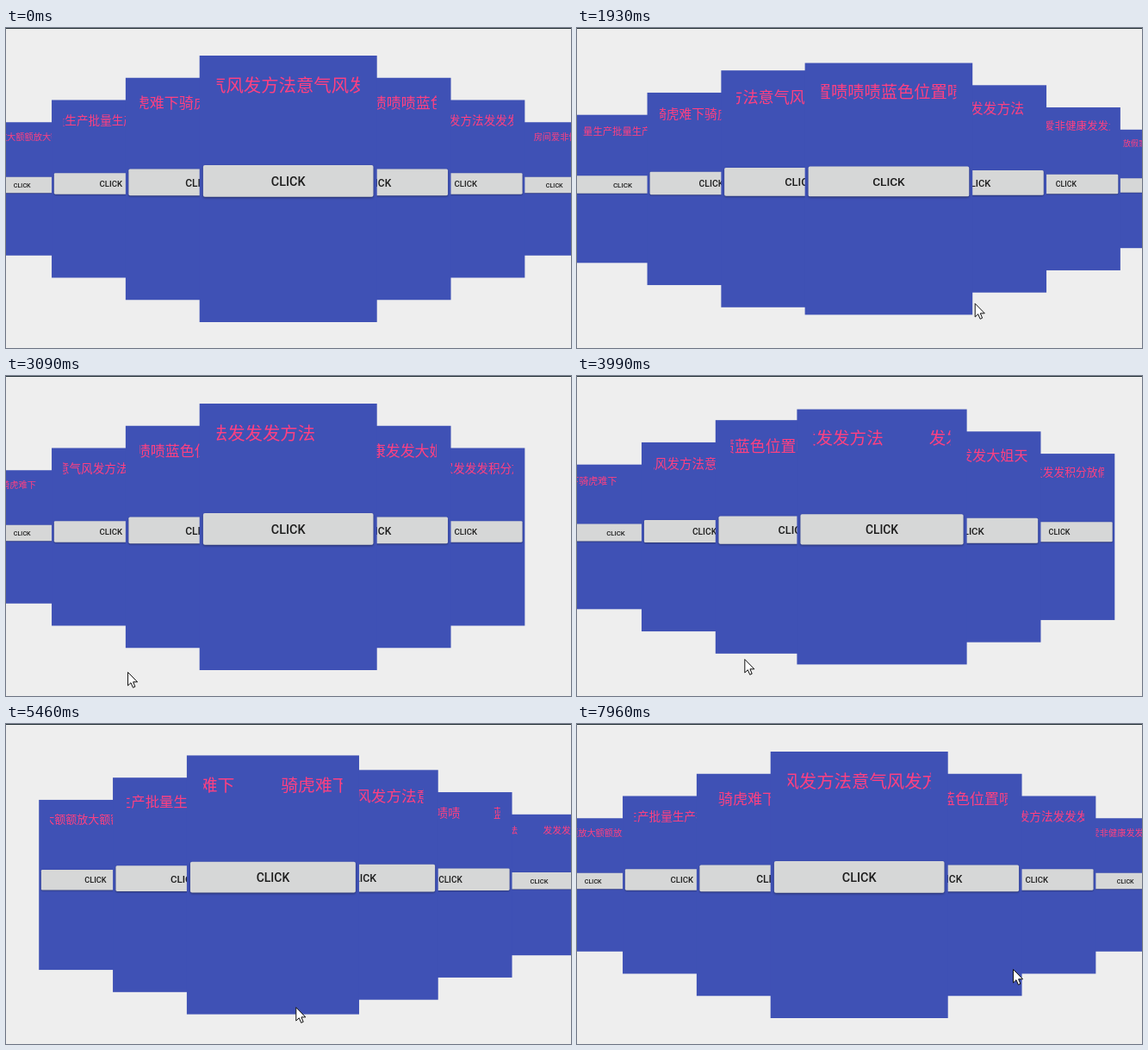
These frames come from a looping animation (656 px wide and 371 px high, 8000 ms). An HTML page with a canvas:

```html
<!DOCTYPE html>
<html lang="zh-CN">
<head>
<meta charset="utf-8">
<title>Card pager</title>
<style>
html, body { margin: 0; width: 100%; height: 100%; overflow: hidden; background: #eee; }
canvas { display: block; width: 656px; height: 371px; }
</style>
</head>
<body>
<canvas id="stage" width="656" height="371"></canvas>
<script>
const ctx = document.getElementById('stage').getContext('2d');
const LOOP = 8000;
const CENTER = { x: 327.7, y: 186.5 };
const CARD = { w: 206, h: 309, step: 103 };
const GLYPH = 20.4;
const FIELD = 83;              // half width of the text field
const GAP = FIELD * 2 / 3;     // space between marquee rounds
const SPEED = 33;              // px per second
const PAUSE = 1.2;             // seconds of rest before each round

// start: second at which a round begins; restart applies once the page was recreated
const cards = [
  { word: '放大额额', count: 8, start: -1.64, restart: -0.47 },
  { word: '生产批量', count: 7, start: -2.38 },
  { word: '骑虎难下', count: 4, start: -3.3 },
  { word: '意气风发方法', count: 5, start: -0.91 },
  { word: '蓝色位置啧啧啧', count: 3, start: -4.5 },
  { word: '发发发方法', count: 4, start: -5.8 },
  { word: '房间爱非健康发发大姐天', count: 1, start: 2.26, restart: 6.81 },
  { word: '放假家发发发积分', count: 4, start: 3.1 }
].map((c, index) => ({ ...c, index, text: c.word.repeat(c.count) }));

// [ms, page]
const pageKeys = [
  [0, 3], [1500, 3], [1600, 3.1], [1930, 3.666], [2470, 4.65], [2620, 4.88], [2800, 5],
  [3820, 5], [3900, 4.93], [4160, 4.4], [4720, 3.195], [5000, 2.59], [5200, 2.36],
  [5460, 2.173], [5780, 2], [6260, 2], [6400, 2.09], [6670, 2.36], [6760, 2.453],
  [7100, 2.8], [7280, 2.95], [7470, 3], [LOOP, 3]
];

// [ms, x, y]
const cursorKeys = [
  [420, 560, 371], [850, 600, 318], [1500, 590, 316], [1930, 462, 319], [2470, 300, 326],
  [3090, 141, 343], [3330, 150, 330], [3820, 170, 328], [4720, 298, 328], [5460, 336, 328],
  [5800, 440, 352], [6280, 480, 352], [6760, 392, 350], [7250, 330, 352], [7500, 330, 352],
  [7960, 506, 284], [LOOP, 506, 284]
];

function sample(keys, t) {
  let i = 1;
  while (i < keys.length - 1 && keys[i][0] < t) i++;
  const a = keys[i - 1], b = keys[i];
  const k = Math.min(1, Math.max(0, (t - a[0]) / (b[0] - a[0])));
  return a.slice(1).map((v, n) => v + (b[n + 1] - v) * k);
}

const mod = (a, n) => ((a % n) + n) % n;

function drawMarquee(card, t) {
  const period = card.text.length * GLYPH + GAP;
  const late = card.restart !== undefined && t > (card.index ? 5500 : 3000);
  const elapsed = mod(t / 1000 - (late ? card.restart : card.start), period / SPEED + PAUSE);
  const shift = Math.min(elapsed * SPEED, period);
  ctx.save();
  ctx.beginPath();
  ctx.rect(-FIELD, -140, FIELD * 2, 40);
  ctx.clip();
  ctx.fillStyle = '#ff4081';
  ctx.font = `${GLYPH}px "Noto Sans CJK SC", "Noto Sans CJK", sans-serif`;
  ctx.textAlign = 'left';
  ctx.textBaseline = 'alphabetic';
  ctx.fillText(card.text, -FIELD - shift, -112.2);
  ctx.fillText(card.text, -FIELD - shift + period, -112.2);
  ctx.restore();
}

function drawButton(scale) {
  ctx.save();
  ctx.shadowColor = 'rgba(0,0,0,.4)';
  ctx.shadowBlur = 2.5 * scale;
  ctx.shadowOffsetY = 1.2 * scale;
  ctx.fillStyle = '#d6d7d7';
  ctx.beginPath();
  ctx.roundRect(-98.8, -27.5, 197.6, 36.8, 2);
  ctx.fill();
  ctx.restore();
  ctx.fillStyle = '#1c1c1c';
  ctx.font = '500 14.4px Roboto, sans-serif';
  ctx.textAlign = 'center';
  ctx.textBaseline = 'alphabetic';
  ctx.fillText('CLICK', 0, -3.6);
}

function drawCard(card, d, t) {
  const scale = 1 - Math.abs(d) / 6;
  ctx.save();
  ctx.translate(CENTER.x + d * CARD.step, CENTER.y);
  ctx.scale(scale, scale);
  ctx.fillStyle = '#3f51b5';
  ctx.fillRect(-CARD.w / 2, -CARD.h / 2, CARD.w, CARD.h);
  ctx.beginPath();
  ctx.rect(-CARD.w / 2, -CARD.h / 2, CARD.w, CARD.h);
  ctx.clip();
  drawMarquee(card, t);
  drawButton(scale);
  ctx.restore();
}

function drawCursor(x, y) {
  const outline = [[0.5, 0.5], [0.5, 16], [4, 12.7], [6.4, 18.3], [8.9, 17.2], [6.6, 11.8], [11.6, 11.8]];
  ctx.save();
  ctx.translate(x, y);
  ctx.beginPath();
  outline.forEach(p => ctx.lineTo(...p));
  ctx.closePath();
  ctx.fillStyle = '#fff';
  ctx.fill();
  ctx.strokeStyle = '#111';
  ctx.lineWidth = 1;
  ctx.stroke();
  ctx.restore();
}

function draw(t) {
  ctx.fillStyle = '#eee';
  ctx.fillRect(0, 0, 656, 371);
  const [page] = sample(pageKeys, t);
  // farthest first, so that the nearest card lies on top
  cards
    .map(card => ({ card, d: card.index - page }))
    .sort((a, b) => Math.abs(b.d) - Math.abs(a.d))
    .forEach(({ card, d }) => drawCard(card, d, t));
  ctx.fillStyle = '#263238';
  ctx.fillRect(0, 0, 656, 1);
  if (t >= cursorKeys[0][0]) drawCursor(...sample(cursorKeys, t));
}

function tick() {
  draw(performance.now() % LOOP);
  requestAnimationFrame(tick);
}
tick();
</script>
</body>
</html>
```
